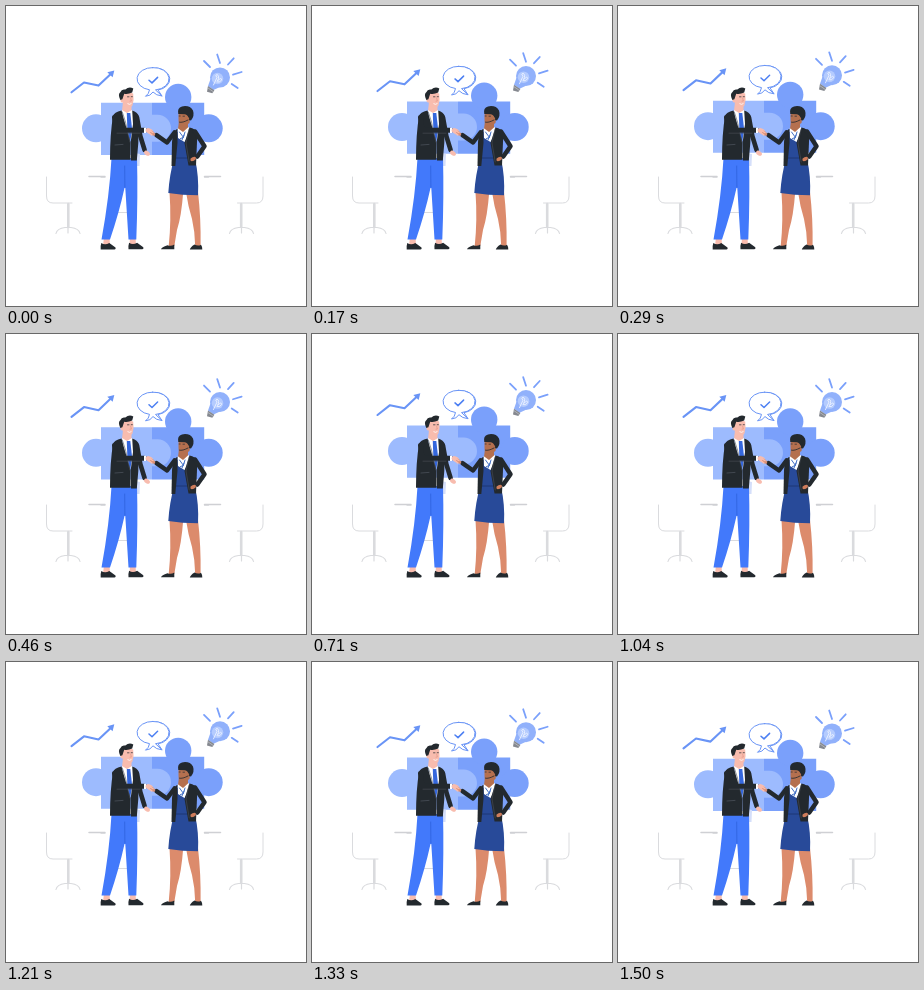
An HTML page with a canvas that plays this animation: 300x300 px, repeating every 1.54 s.

```html
<!DOCTYPE html>
<html lang="en">
<head>
<meta charset="utf-8">
<title>Handshake</title>
<style>
  html, body { margin: 0; width: 100%; height: 100%; overflow: hidden; background: #fff; }
  canvas { display: block; width: 300px; height: 300px; }
</style>
</head>
<body>
<canvas id="stage"></canvas>
<script>
const LOOP = 1540, RISE = 750, LIFT = 5.6;
const BLUE = '#6994f6', LIGHT_BLUE = '#9dbbfe', MID_BLUE = '#7aa0fb';
const BLACK = '#23292e', SEAM = '#4a5058', GREY = '#dadbde';
const SKIN = '#f8bcae', BROWN = '#b5704f', TAN = '#dc8b6c';

const canvas = document.getElementById('stage');
const scale = window.devicePixelRatio || 1;
canvas.width = canvas.height = 300 * scale;
const ctx = canvas.getContext('2d');
ctx.lineCap = ctx.lineJoin = 'round';

function fill(d, color) {
  ctx.fillStyle = color;
  ctx.fill(new Path2D(d));
}

function line(d, color, width = 1) {
  ctx.strokeStyle = color;
  ctx.lineWidth = width;
  ctx.stroke(new Path2D(d));
}

function disc(x, y, rx, color, ry = rx, turn = 0) {
  ctx.fillStyle = color;
  ctx.beginPath();
  ctx.ellipse(x, y, rx, ry, turn, 0, Math.PI * 2);
  ctx.fill();
}

function chair() {
  line('M40.5 171V190Q40.5 197 47 197H66', GREY);
  line('M62.3 198V221', GREY, 2.6);
  line('M50 227.5Q51 222.5 59 221.5H65Q73 222.5 74 227.5M62 221V227', GREY, 1.2);
  line('M83 170.5H99', '#cfd0d4', 1.5);
  line('M95 171.5H99', GREY, 1.2);
}

function furniture() {
  chair();
  ctx.save();
  ctx.translate(297.5, 0);
  ctx.scale(-1, 1);
  chair();
  ctx.restore();
  line('M110 206.5H121', GREY);
}

function puzzle() {
  fill('M146 96.8H198.2V149H146Z', MID_BLUE);
  disc(172.2, 91, 13.2, MID_BLUE);
  disc(202.7, 122.3, 14, MID_BLUE);
  disc(90, 122.3, 14, LIGHT_BLUE);
  fill('M95 96.8H146V108.8H151.5A13.5 13.5 0 0 1 151.5 135.8H146V149H95Z', LIGHT_BLUE);
}

function trend() {
  line('M65.5 86.3L78 76.5L92.5 79.6L104.5 68.3', BLUE, 2.1);
  fill('M108.3 64.5L101.3 66.3L106.6 71.3Z', BLUE);
}

function bubble() {
  const outline = 'M146.7 61.6A15.3 11.2 0 0 1 149.5 83.9L156 90Q150 89.5 147 86Q144.5 90 139.5 90.3Q143 88 143.5 83.8A15.3 11.2 0 0 1 146.7 61.6Z';
  line('M150 61.9A15 11.2 0 0 1 152 84L156 90', BLUE);
  fill(outline, '#fff');
  line(outline, BLUE);
  line('M143 74.2L146 76.9L151.6 71.4', '#4c7ff2', 1.5);
}

function bulb() {
  line('M198 55L204 61M211.2 48.5L214 57M227.7 52.3L222 58.5M235.6 66L227 68.7M231.7 82L225.7 78', MID_BLUE, 1.8);
  disc(214, 71.4, 10, '#91b1fb');
  fill('M204.5 73L202 80L207.5 84L214 81Z', '#91b1fb');
  disc(211.5, 72.5, 5.8, '#b4cbfe');
  line('M207.5 79L211 71.5Q208.5 69 211 68.5Q214 70 211.5 75Q215.5 70.5 215.5 74Q214 77 211 76', '#eef3ff', 0.9);
  fill('M202 80L208.4 84.2L206.3 87.2L201 85.7Z', '#85888f');
  line('M202 82L207 85.5', '#c4c7cc', 0.7);
}

function man() {
  fill('M129 147L134 148L133.5 160H130Z', '#d5dffa');
  fill('M98 231H103.5L104 240H97ZM124 231H129.5L130 240H123.5Z', SKIN);
  fill('M105.5 152H131Q132 190 130.3 233.5H122.5L119.3 182L118.5 182Q113 207 104 233.5H95.5Q103.5 190 105.5 152Z', '#4279fb');
  line('M118.7 160L118.9 181', '#2e61dc', 0.8);
  const shoe = 'M95.3 237Q99 239.5 103.3 237L109.5 241.5Q110.2 243.5 108.5 243.5H94.7Q94.4 239.5 95.3 237Z';
  fill(shoe, BLACK);
  ctx.save();
  ctx.translate(27.8, -0.2);
  fill(shoe, BLACK);
  ctx.restore();

  line('M131 111.5L134.3 130L138.6 144', BLACK, 4.6);
  disc(141, 147.2, 3.2, SKIN, 2.1, 0.6);

  fill('M117 96H125.5V107L121 112L116 105Z', SKIN);
  fill('M116 104L121 107L126 104L130 109L126 138L117 112Z', '#fff');
  fill('M120.8 107H124.3L126.2 124L124 137L121.3 122Z', '#3567dd');
  fill('M115.5 104.5Q108 106 107 110Q104 128 104 153.8H124.5V136L117.5 112Z', BLACK);
  fill('M126.2 104.5Q131.5 106 132.8 110L132.3 137L130.8 154.5H125L124.6 137L127 118Z', BLACK);
  line('M116.3 106L119.5 116L123.8 136', SEAM, 0.6);
  line('M109 139L117 138.4', SEAM, 0.8);
  line('M108.5 111.5L110 124.2H138.5', BLACK, 5);
  line('M111 127.2H134', SEAM, 0.6);
  fill('M138 121.8H140V127H138Z', '#fff');

  fill('M115.5 88Q116 99 119.5 101.5Q124 103 126.5 99.5Q128.2 94 127.2 87.5L120 85.5Z', SKIN);
  disc(116, 94.5, 1.5, SKIN, 2);
  fill('M114.3 94Q111.5 88 114.5 86Q115.5 82.8 119.3 83.6Q123 80.3 127.3 82.5L126.2 86.6Q122 88.6 118.2 87.8L116.4 93.2Z', BLACK);
  line('M121.5 90.8H123M125.2 90.7H126.4', BLACK, 0.7);
  line('M124.6 92L125.4 95L124 95.2', '#df8f7f', 0.6);
  line('M121.8 97.8Q123.7 99.2 125.2 97.7', '#fff', 0.8);
}

function woman() {
  fill('M163.5 186H177.2Q175.5 210 171 224L168.3 240H162.7Q165.5 214 163.5 186Z', TAN);
  fill('M180 186H192Q195 212 194.6 240H189.2Q189 226 186 213Q182 200 180 186Z', TAN);
  fill('M161.5 239.2Q165 240.5 168.3 238.5V243.3H155Q155.5 241.3 161.5 239.2Z', BLACK);
  fill('M188.5 238.5Q192 240.5 195 238.7Q196.6 241 196.3 243.6H183.8Q184.2 241.3 188.5 238.5Z', BLACK);
  fill('M169 126H187L189 153Q193 170 192 189.3Q176 189.3 162.3 187Q163.5 168 168.5 151Z', '#284a99');
  line('M168 152H188', '#1d3775', 1);

  fill('M173 115H182V124L177.5 130L172 123Z', BROWN);
  fill('M171.5 122L177 126L182.5 121L185 125L178.5 136L172 132Z', '#fff');
  line('M173.5 126L177.5 131.5L174.5 132.5M178 129L176 134M179 126L177.5 131', '#416fc5', 1);

  fill('M171.5 122.5Q166.5 125.5 166 136L165.5 160H169.3L171.5 137Z', BLACK);
  fill('M183.5 121.5Q189.5 122.5 191.4 127L190 159.5H182.5L178.5 137Z', BLACK);
  line('M168.5 126.5L161 136.5L150.5 129.2', BLACK, 4.5);
  line('M189 125.5L198.5 140.3L191.3 150.5', BLACK, 4.5);
  disc(187.2, 153, 3, '#cf7d5b', 1.8, -0.4);
  line('M183 123L180 137L183.2 156', SEAM, 0.6);

  fill('M172.8 105Q171.7 117 174 119.3Q179 121 183.5 117L185 105Z', BROWN);
  fill('M172.3 108Q171 101.5 176 100.4Q184 99 187 104.5Q188.8 110 185 114.5L182.5 114Q183 109.5 179 108.3Z', BLACK);
  disc(182, 113, 1.2, BROWN, 1.7);
  line('M173.2 110H174.2M177 110.2H178.5', BLACK, 0.7);
  line('M173.5 116.2Q176.5 117 182 114', BLACK, 0.8);
}

function handshake() {
  disc(143.2, 124.8, 3.7, SKIN, 2.5, 0.3);
  disc(146.7, 127.3, 3, '#d98f73', 1.8, 0.7);
  line('M142.5 124L147 126.6M142 126L145.8 128.8', SKIN, 1.6);
}

// Rises and falls at a steady pace, then rests until the loop restarts.
function floatOffset(time) {
  const distance = Math.abs(time % LOOP - RISE) / RISE;
  return -LIFT * Math.max(0, 1 - distance);
}

function render(time) {
  ctx.setTransform(scale, 0, 0, scale, 0, 0);
  ctx.fillStyle = '#fff';
  ctx.fillRect(0, 0, 300, 300);
  furniture();
  ctx.save();
  ctx.translate(0, floatOffset(time));
  puzzle();
  trend();
  bubble();
  bulb();
  ctx.restore();
  man();
  woman();
  handshake();
}

const start = performance.now();
function tick() {
  render(performance.now() - start);
  requestAnimationFrame(tick);
}
tick();
</script>
</body>
</html>
```
